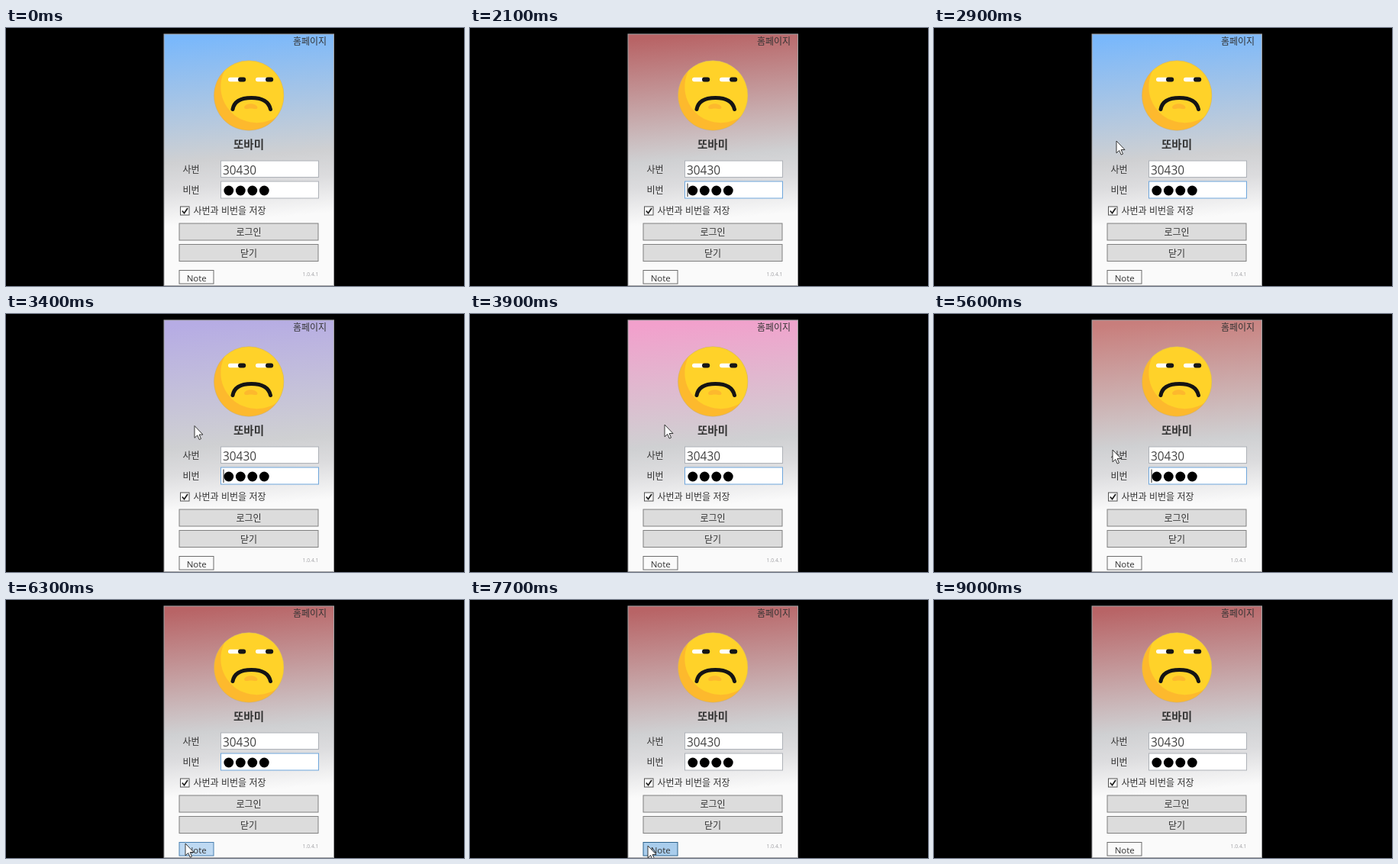
Animation, 600 px wide and 338 px high, one loop 9.1 s. Source, as an HTML page:

```html
<!DOCTYPE html>
<html lang="ko">
<head>
<meta charset="utf-8">
<title>로그인</title>
<style>
  html, body { margin: 0; width: 100%; height: 100%; overflow: hidden; background: #000; }
  svg { display: block; width: 100vw; height: 100vh; }
  text { font: 12px "Noto Sans CJK KR", "Noto Sans CJK", sans-serif; fill: #333; }
  .latin { font-family: "Open Sans", "Noto Sans", sans-serif; }
  .mid { text-anchor: middle; }
</style>
</head>
<body>
<svg viewBox="0 0 600 338" xmlns="http://www.w3.org/2000/svg">
  <defs>
    <linearGradient id="sky" gradientUnits="userSpaceOnUse" x1="308" y1="8" x2="328" y2="250">
      <stop id="tint" offset="0"/>
      <stop offset=".66" stop-color="#cfd0d2"/>
      <stop offset=".8" stop-color="#dcdcde"/>
      <stop offset="1" stop-color="#fafafa"/>
    </linearGradient>
    <clipPath id="face"><circle cx="318.2" cy="88.5" r="45.8"/></clipPath>
  </defs>

  <rect width="600" height="338"/>
  <rect x="207" y="8" width="222.5" height="329.5" fill="url(#sky)" stroke="#a2a2a4"/>
  <text x="376" y="22">홈페이지</text>

  <g clip-path="url(#face)">
    <rect x="272" y="42" width="93" height="93" fill="#fdb92d"/>
    <circle cx="328.5" cy="77" r="47.2" fill="#ffd229"/>
  </g>
  <circle cx="318.2" cy="88.5" r="45.8" fill="none" stroke="#b5aa96" stroke-opacity=".55" stroke-width=".8"/>
  <g id="eyes"></g>
  <path d="M297 106.500C299 95.500 308 91.500 321.500 91.500S344 95.500 346.500 106.500" fill="none" stroke="#141414" stroke-width="5" stroke-linecap="round"/>
  <path d="M312 104C313 97.500 328 97.500 329.500 104C329 107.500 325 105.500 320.800 105.500S313 107.500 312 104Z" fill="#fdb92d"/>
  <text class="mid" x="318" y="158" style="font-size:14.5px;font-weight:700">또바미</text>

  <text x="231.500" y="189.500">사번</text>
  <text x="231.500" y="217">비번</text>
  <rect x="281.500" y="174" width="128" height="21.500" fill="#fff" stroke="#aeb2b8"/>
  <text class="latin" x="284" y="191.500" style="font-size:15.4px;fill:#444">30430</text>
  <rect id="pass" x="281.500" y="201" width="128" height="22" fill="#fff"/>
  <g id="dots"></g>
  <path id="caret" d="M285 203.500V221" stroke="#222"/>

  <rect x="228.500" y="234" width="11.500" height="11" fill="#fff" stroke="#505050"/>
  <path d="M230.800 239.500L233.500 242.500L238 236" fill="none" stroke="#222" stroke-width="1.800"/>
  <text x="245.500" y="243.500">사번과 비번을 저장</text>

  <rect id="login" x="227" y="256" width="182" height="22"/>
  <text class="mid" x="318" y="271.500">로그인</text>
  <rect id="close" x="227" y="283.500" width="182" height="22"/>
  <text class="mid" x="318" y="299.500">닫기</text>
  <rect id="note" x="227" y="317.500" width="45" height="17.500"/>
  <text class="latin mid" x="249.700" y="331.500" style="font-size:11.5px">Note</text>
  <text class="latin" x="409.500" y="325" text-anchor="end" style="font-size:6.8px;fill:#a0a0a4">1.0.4.1</text>

  <path id="cursor" d="M0 0V15.800L3.700 12.400L6.200 18L8.500 17L6.100 11.500H11Z" fill="#fff" stroke="#222" stroke-width=".9" stroke-linejoin="round"/>
</svg>
<script>
const LOOP = 9100, STEP = 100, BLINK = 530;
const $ = id => document.getElementById(id);
const BLUE = [122, 184, 251], RED = [184, 100, 102], PINK = [242, 160, 204], PEACH = [236, 186, 174];

// [ms, ...values], blended between neighbours; equal times make a hard change
const tints = [
  [0, ...BLUE], [2100, ...BLUE], [2100, ...RED], [2900, ...BLUE],
  [3900, ...PINK], [4900, ...PEACH], [5900, ...RED]
];
const path = [
  [2100, 285, 212], [2900, 239, 148], [3900, 255, 145], [4900, 236, 119],
  [5400, 236, 126], [6000, 230, 282], [6100, 223, 300], [6300, 235, 319],
  [7000, 240, 322], [7200, 233, 322]
];

const pill = (x, y, w, h, c) =>
  `<rect x="${x}" y="${y}" width="${w}" height="${h}" rx="${h / 2}" fill="${c}"/>`;
$('eyes').innerHTML = [291, 327].map(x =>
  pill(x, 64.7, 16, 5.6, '#fff') + pill(x + 13, 64.5, 10.2, 6, '#161616')).join('');
$('dots').innerHTML = [0, 1, 2, 3].map(i =>
  `<circle cx="${291.8 + i * 15.5}" cy="213" r="6.4"/>`).join('');

function paint(el, fill, stroke) {
  el.setAttribute('fill', fill);
  el.setAttribute('stroke', stroke);
}

function valueAt(keys, t) {
  const i = keys.findIndex(k => k[0] > t);
  if (i < 1) return keys[i < 0 ? keys.length - 1 : 0].slice(1);
  const a = keys[i - 1], b = keys[i];
  const f = (t - a[0]) / (b[0] - a[0]);
  return a.slice(1).map((v, n) => v + (b[n + 1] - v) * f);
}

function draw(t) {
  const shown = t >= 2200 && t < 8400;
  const focused = t >= 2100 && t < 6900;
  const [x, y] = valueAt(path, t);
  const over = (top, bottom) => shown && x >= 227 && y >= top && y <= bottom;

  $('tint').setAttribute('stop-color', `rgb(${valueAt(tints, t).map(Math.round)})`);
  $('pass').setAttribute('stroke', focused ? '#6ea6dc' : '#aeb2b8');
  const lit = focused && Math.floor((t - 2100) / BLINK) % 2 === 0;
  $('caret').style.display = lit ? '' : 'none';

  for (const [id, top] of [['login', 256], ['close', 283.5]]) {
    if (over(top, top + 22)) paint($(id), '#bed9f2', '#4a80b0');
    else paint($(id), '#dcdcdc', '#808080');
  }
  const hot = t < 9000 && (over(317, 335) || t >= 8400);
  const down = t >= 7700 && t < 8000;
  if (hot) paint($('note'), down ? '#a9cdec' : '#bed9f2', down ? '#2c628b' : '#4a80b0');
  else paint($('note'), '#fafafa', '#6c6c6c');

  $('cursor').style.display = shown ? '' : 'none';
  $('cursor').setAttribute('transform', `translate(${x.toFixed(1)} ${y.toFixed(1)})`);
}

function tick() {
  draw(Math.floor(performance.now() % LOOP / STEP) * STEP);
  requestAnimationFrame(tick);
}
tick();
</script>
</body>
</html>
```
